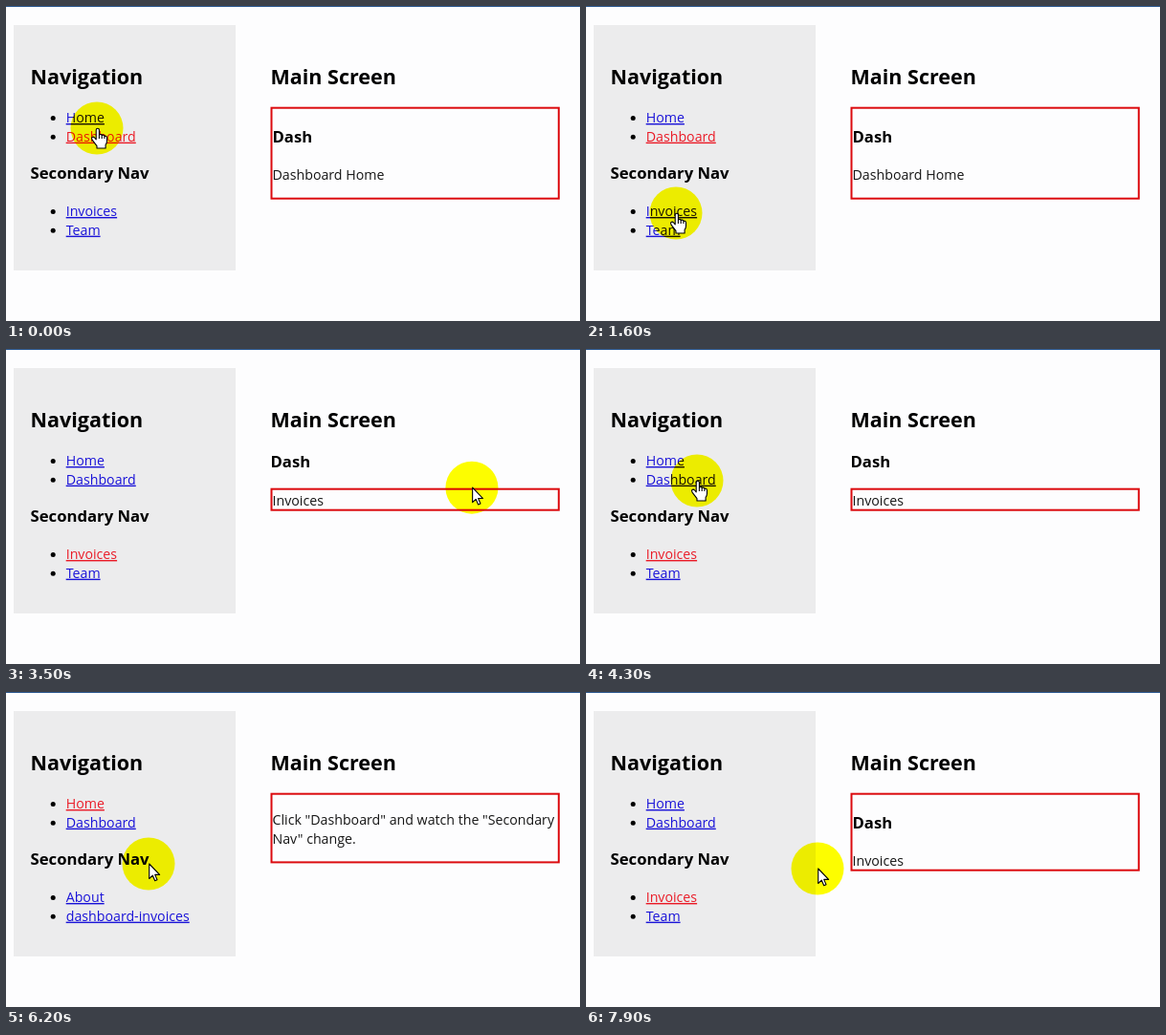
Animation, 600 px wide and 330 px high, one loop 8 s. Source, as an HTML page:

```html
<!DOCTYPE html>
<html lang="en">
<head>
<meta charset="utf-8">
<title>Nested navigation</title>
<style>
  html, body { margin: 0; width: 100%; height: 100%; overflow: hidden; background: #fdfdfe; }
  svg { display: block; width: 100%; height: 100%; }
  text { font: 14.2px "Open Sans", "Noto Sans", sans-serif; fill: #161616; white-space: pre; }
  .h2 { font-size: 21.5px; font-weight: 700; fill: #000; }
  .h3 { font-size: 16.7px; font-weight: 700; fill: #000; }
  .link { fill: #1a13d8; text-decoration: underline; }
  .link.on { fill: #ea1c28; }
  #spot { fill: #ff0; mix-blend-mode: multiply; }
  #ring { fill: none; stroke: #e40c0c; stroke-width: 2.8; }
  #arrow, #hand { fill: #fff; stroke: #000; stroke-width: 1.1; stroke-linejoin: round; }
</style>
</head>
<body>
<svg viewBox="0 0 600 330">
  <rect width="600" height="330" fill="#fdfdfe"/>
  <rect width="600" height="1" fill="#2f5b93"/>
  <rect x="8" y="20" width="232" height="257" fill="#ececed"/>
  <g id="page"></g>
  <g id="pointer">
    <circle id="spot" r="27.5"/>
    <circle id="ring" cx=".8" cy=".5" r="5.4"/>
    <path id="arrow" d="M.7 0V15.5L4.3 12.2 6.7 17.8 9 16.8 6.7 11.4H11.6Z"/>
    <path id="hand" d="M-.8 2Q-.8 .2 .8 .2 2.4 .2 2.4 2V7.6Q2.5 6.4 3.8 6.4 5.2 6.4 5.2 8 5.4 7 6.6 7.1 7.9 7.2 7.9 8.8 8.3 8 9.3 8.2 10.5 8.5 10.5 10V13.5Q10.5 15.5 9.1 17.5V21H0V18.6L-4.8 12.4Q-6 10.4-5 9.4-3.6 8.6-2.4 10L-.8 11.8ZM2.4 7.6V11M5.2 8V11M7.9 8.8V11"/>
  </g>
</svg>
<script>
const LOOP = 8000, STEP = 100, ROW = 19.7;
const $ = id => document.getElementById(id);
const page = $('page'), pointer = $('pointer');

const dashNav = ['Invoices', 'Team'], homeNav = ['About', 'dashboard-invoices'];
const intro = ['Click "Dashboard" and watch the "Secondary', 'Nav" change.'];

// title: whether the red frame surrounds "Dash"; margin: space below the last line
const views = [
  { from: 0, on: 'Dashboard', nav: dashNav, title: 'inside', lines: ['Dashboard Home'], margin: 15 },
  { from: 2200, on: 'Invoices', nav: dashNav, title: 'outside', lines: ['Invoices'], margin: 0 },
  { from: 5300, on: 'Home', nav: homeNav, title: 'none', lines: intro, margin: 15 },
  { from: 7500, on: 'Invoices', nav: dashNav, title: 'inside', lines: ['Invoices'], margin: 0 }
];
// baselines of title and first line, and top of the frame
const layouts = {
  inside: { x: 278.5, title: 143, line: 182, top: 106 },
  outside: { x: 276.5, title: 124, line: 164, top: 146 },
  none: { line: 139, top: 106 }
};

const smooth = k => k * k * (3 - 2 * k);
const speedUp = k => k * k;
const steady = k => k;

// bow: how far the way swings to the right
const home = [95, 128];
const moves = [
  { from: 200, until: 1100, to: [96, 262], bow: 22 },
  { from: 1100, until: 1600, to: [94, 217], bow: 16 },
  { from: 2100, until: 2900, to: [168, 186], ease: speedUp },
  { from: 2900, until: 3100, to: [530, 146], ease: steady },
  { from: 3300, until: 4300, to: [116, 138] },
  { from: 4300, until: 4800, to: [84, 130], bow: 30 },
  { from: 4900, until: 5100, to: [84, 117] },
  { from: 5300, until: 5800, to: [87, 128], ease: speedUp },
  { from: 5800, until: 6600, to: [99, 232], bow: 56 },
  { from: 7400, until: 7900, to: [242, 185] }
];
const clicks = [2100, 5200, 7400];

const text = (s, x, y, cls = '') => `<text class="${cls}" x="${x}" y="${y}">${s}</text>`;

const list = (names, y0, on) => names.map((name, i) => {
  const y = y0 + i * ROW;
  return `<circle cx="49.2" cy="${y - 4.4}" r="2.5"/>` +
    text(name, 62.7, y, name === on ? 'link on' : 'link');
}).join('');

function drawView({ on, nav, title, lines, margin }) {
  const { x, title: titleY, line, top } = layouts[title];
  const bottom = line + (lines.length - 1) * ROW + 6 + margin;
  page.innerHTML =
    text('Navigation', 25.5, 82, 'h2') + list(['Home', 'Dashboard'], 122, on) +
    text('Secondary Nav', 25.5, 181, 'h3') + list(nav, 220, on) +
    text('Main Screen', 276.5, 82, 'h2') +
    (titleY ? text('Dash', x, titleY, 'h3') : '') +
    lines.map((s, i) => text(s, 278.5, line + i * ROW)).join('') +
    `<rect x="277.5" y="${top + .7}" width="300.3" height="${bottom - top - 2}"
      fill="none" stroke="#dc0b0f" stroke-width="2"/>`;
}

function pointerAt(t) {
  let [x, y] = home;
  for (const { from, until, to, ease = smooth, bow = 0 } of moves) {
    if (t <= from) break;
    const k = ease(Math.min(1, (t - from) / (until - from)));
    x += (to[0] - x) * k + bow * Math.sin(Math.PI * k);
    y += (to[1] - y) * k;
  }
  return [x, y];
}

const overLink = (x, y) => [...page.querySelectorAll('.link')].some(el => {
  const b = el.getBBox();
  return x >= b.x && x <= b.x + b.width && y >= b.y && y <= b.y + b.height;
});

const show = (id, visible) => $(id).setAttribute('visibility', visible ? 'visible' : 'hidden');

let current;
function render(ms) {
  const t = Math.floor((ms % LOOP) / STEP) * STEP;
  const view = views.findLast(v => t >= v.from);
  if (view !== current) drawView(current = view);
  const [x, y] = pointerAt(t);
  const link = overLink(x, y);
  pointer.setAttribute('transform', `translate(${x} ${y})`);
  show('hand', link);
  show('arrow', !link);
  show('ring', clicks.includes(t));
}

const start = performance.now();
function tick() {
  render(performance.now() - start);
  requestAnimationFrame(tick);
}
tick();
</script>
</body>
</html>
```
